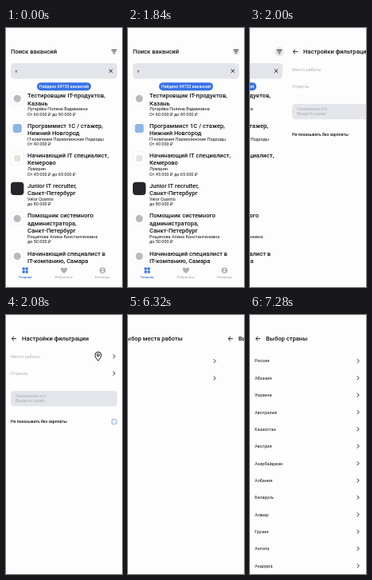
Write an HTML page with a canvas that moves like this. It is 146 px wide and 324 px high and loops after 8000 ms.

```html
<!DOCTYPE html>
<html lang="ru">
<head>
<meta charset="utf-8">
<title>Поиск вакансий</title>
<style>
  html, body { margin: 0; width: 100%; height: 100%; overflow: hidden; background: #fdfdfd; }
  canvas { display: block; width: 146px; height: 324px; }
</style>
</head>
<body>
<canvas id="stage"></canvas>
<script>
const W = 146, H = 324, LOOP = 8000, STEP = 80;
const BG = '#fdfdfd', INK = '#101116', GREY = '#aeafb4', FIELD = '#e4e5ea', BLUE = '#3772e7';
const TITLE = 7.6, BODY = 5.5;

const canvas = document.getElementById('stage');
const ctx = canvas.getContext('2d');
const dpr = window.devicePixelRatio || 1;
canvas.width = W * dpr;
canvas.height = H * dpr;

// y is the middle of the capital letters
function text(str, x, y, size = BODY, color = INK, weight = 400, align = 'left') {
  ctx.save();
  ctx.translate(x, y + size * 0.355);
  ctx.scale(0.1, 0.1);
  ctx.font = `${weight} ${size * 10}px Roboto, "Noto Sans", sans-serif`;
  ctx.textAlign = align;
  ctx.fillStyle = color;
  ctx.fillText(str, 0, 0);
  ctx.restore();
}

function box(x, y, w, h, r, fill, stroke) {
  ctx.beginPath();
  ctx.roundRect(x, y, w, h, r);
  if (fill) { ctx.fillStyle = fill; ctx.fill(); }
  if (stroke) { ctx.strokeStyle = stroke; ctx.lineWidth = 0.6; ctx.stroke(); }
}

function disc(x, y, r, fill) {
  ctx.beginPath();
  ctx.arc(x, y, r, 0, Math.PI * 2);
  ctx.fillStyle = fill;
  ctx.fill();
}

function line(points, width = 0.9, color = INK) {
  ctx.beginPath();
  points.forEach(([x, y]) => ctx.lineTo(x, y));
  ctx.strokeStyle = color;
  ctx.lineWidth = width;
  ctx.stroke();
}

const chevron = y => line([[134.8, y - 2.4], [137.2, y], [134.8, y + 2.4]]);

function header(title) {
  line([[7.3, 29.6], [13, 29.6]]);
  line([[10, 26.8], [7.2, 29.6], [10, 32.4]]);
  text(title, 20, 29.6, TITLE, INK, 500);
}

const jobs = [
  { y: 84.7, title: ['Тестировщик IT-продуктов,', 'Казань'],
    info: ['Лугарёва Полина Вадимовна', 'От 60 000 ₽ до 90 000 ₽'] },
  { y: 122, logo: '#8db6e4', size: 11, title: ['Программист 1С / стажер,', 'Нижний Новгород'],
    info: ['IT-компания Пармолинские Подходы', 'От 40 000 ₽'] },
  { y: 159.5, logo: '#e6e2dc', size: 8, title: ['Начинающий IT специалист,', 'Кемерово'],
    info: ['Лумарин', 'От 45 000 ₽ до 65 000 ₽'] },
  { y: 197.3, logo: '#25262b', size: 16.4, title: ['Junior IT recruiter,', 'Санкт-Петербург'],
    info: ['Velor Quantis', 'до 80 000 ₽'] },
  { y: 234.8, title: ['Помощник системного', 'администратора,', 'Санкт-Петербург'],
    info: ['Рощепова Алина Константиновна', 'до 50 000 ₽'] },
  { y: 282, title: ['Начинающий специалист в', 'IT-компанию, Самара'], info: [] }
];

function jobCard({ y, logo, size, title, info }) {
  const mid = y + 3.6;
  box(6, mid - 8.2, 16.4, 16.4, 4, '#fff', '#ececef');
  if (logo) box(14.2 - size / 2, mid - size / 2, size, size, size / 4, logo);
  else disc(14.2, mid, 4.6, '#b9babf');
  title.forEach((s, i) => text(s, 27, y + i * 9.2, TITLE, INK, 500));
  const top = y + title.length * 9.2 - 1.8;
  info.forEach((s, i) => text(s, 27, top + i * 6.6));
}

function navBar() {
  for (const x of [20.6, 24.6])
    for (const y of [299.6, 303.6]) box(x, y, 3.1, 3.1, 0.6, BLUE);
  ctx.beginPath();
  ctx.moveTo(73, 307);
  ctx.bezierCurveTo(65.5, 302, 70, 297.5, 73, 301);
  ctx.bezierCurveTo(76, 297.5, 80.5, 302, 73, 307);
  ctx.fillStyle = GREY;
  ctx.fill();
  disc(121.5, 303.2, 3.8, GREY);
  disc(121.5, 302, 1.3, BG);
  box(119.6, 304, 3.8, 1.6, 0.8, BG);
  ['Главная', 'Избранное', 'Команда'].forEach((s, i) =>
    text(s, 24.2 + i * 48.6, 311.2, 4.4, i ? GREY : BLUE, 500, 'center'));
}

function searchPage(t) {
  const ripple = Math.min(1, Math.max(0, (t - 1700) / 220));
  if (ripple) disc(136, 29.7, 5.8 * ripple, `rgba(26,27,34,${0.1 * ripple})`);
  text('Поиск вакансий', 6, 29.6, TITLE, INK, 500);
  [3.3, 2.2, 0.9].forEach((r, i) => line([[136 - r, 27.5 + i * 2.2], [136 + r, 27.5 + i * 2.2]]));

  box(6, 44, 134, 19.6, 4.5, FIELD);
  text('т', 11.6, 53.4, 6);
  line([[129.7, 51.5], [134.1, 55.9]]);
  line([[134.1, 51.5], [129.7, 55.9]]);

  ctx.save();
  ctx.beginPath();
  ctx.rect(0, 64, W, 232);
  ctx.clip();
  jobs.forEach(jobCard);
  ctx.restore();

  box(39, 68.2, 68, 10, 4.8, BLUE);
  text('Найдено 69733 вакансий', 73, 73.2, 5.2, '#fff', 500, 'center');
  if (t < 1920) navBar();
}

function pin(x, y) {
  ctx.beginPath();
  ctx.moveTo(x, y + 5.6);
  ctx.bezierCurveTo(x - 2.4, y + 3, x - 3.9, y + 1, x - 3.9, y - 1.4);
  ctx.arc(x, y - 1.4, 3.9, Math.PI, 0);
  ctx.bezierCurveTo(x + 3.9, y + 1, x + 2.4, y + 3, x, y + 5.6);
  ctx.closePath();
  ctx.strokeStyle = INK;
  ctx.lineWidth = 1;
  ctx.stroke();
  ctx.beginPath();
  ctx.arc(x, y - 1.4, 1.5, 0, Math.PI * 2);
  ctx.stroke();
}

function filterPage() {
  header('Настройки фильтрации');
  text('Место работы', 6, 51.7, BODY, GREY);
  text('Отрасль', 6, 73.2, BODY, GREY);
  pin(116, 51.5);
  chevron(51.7);
  chevron(73.2);
  box(6, 95, 134, 19.2, 4.5, FIELD);
  text('Ожидаемая з/п', 12, 101.3, 5.2, GREY);
  text('Введите сумму', 12, 107.2, 5.2, GREY);
  text('Не показывать без зарплаты', 6, 133.6, 5.1, INK, 500);
  box(133.3, 130.7, 5.6, 5.6, 0.7, null, BLUE);
}

function placePage() {
  header('Выбор места работы');
  text('Страна', 6, 57.6, BODY, GREY);
  text('Регион', 6, 78.9, BODY, GREY);
  chevron(57.6);
  chevron(78.9);
}

const countries = ['Россия', 'Абхазия', 'Украина', 'Австралия', 'Казахстан', 'Австрия',
  'Азербайджан', 'Албания', 'Беларусь', 'Алжир', 'Грузия', 'Ангола', 'Андорра'];

function spinner(t) {
  const k = (t - 6240) / 1000;
  const start = k * Math.PI * 3;
  const sweep = Math.PI * (0.9 - 0.6 * Math.cos(k * Math.PI * 2));
  ctx.beginPath();
  ctx.arc(73, 179, 6, start, start + sweep);
  ctx.strokeStyle = BLUE;
  ctx.lineWidth = 1.5;
  ctx.stroke();
}

function countryPage(t) {
  header('Выбор страны');
  if (t < 7200) return spinner(t);
  ctx.globalAlpha = t < 7280 ? 0.6 : 1;
  countries.forEach((name, i) => {
    const y = 57.5 + i * 21.35;
    text(name, 6, y);
    chevron(y);
  });
  ctx.globalAlpha = 1;
}

const pages = [searchPage, filterPage, placePage, countryPage];
const slides = [[1889, 180], [5200, 130], [6269, 180]];

function ease(t, [start, length]) {
  const k = Math.min(1, Math.max(0, (t - start) / length));
  return (1 - Math.cos(Math.PI * k)) / 2;
}

function draw(t) {
  ctx.setTransform(dpr, 0, 0, dpr, 0, 0);
  ctx.fillStyle = BG;
  ctx.fillRect(0, 0, W, H);
  const scroll = slides.reduce((sum, s) => sum + ease(t, s), 0);
  pages.forEach((page, i) => {
    if (Math.abs(i - scroll) >= 1) return;
    ctx.save();
    ctx.translate(Math.round((i - scroll) * W), 0);
    page(t);
    ctx.restore();
  });
}

const begin = performance.now();
function tick() {
  const t = (performance.now() - begin) % LOOP;
  draw(Math.floor(t / STEP) * STEP);
  requestAnimationFrame(tick);
}
tick();
</script>
</body>
</html>
```
